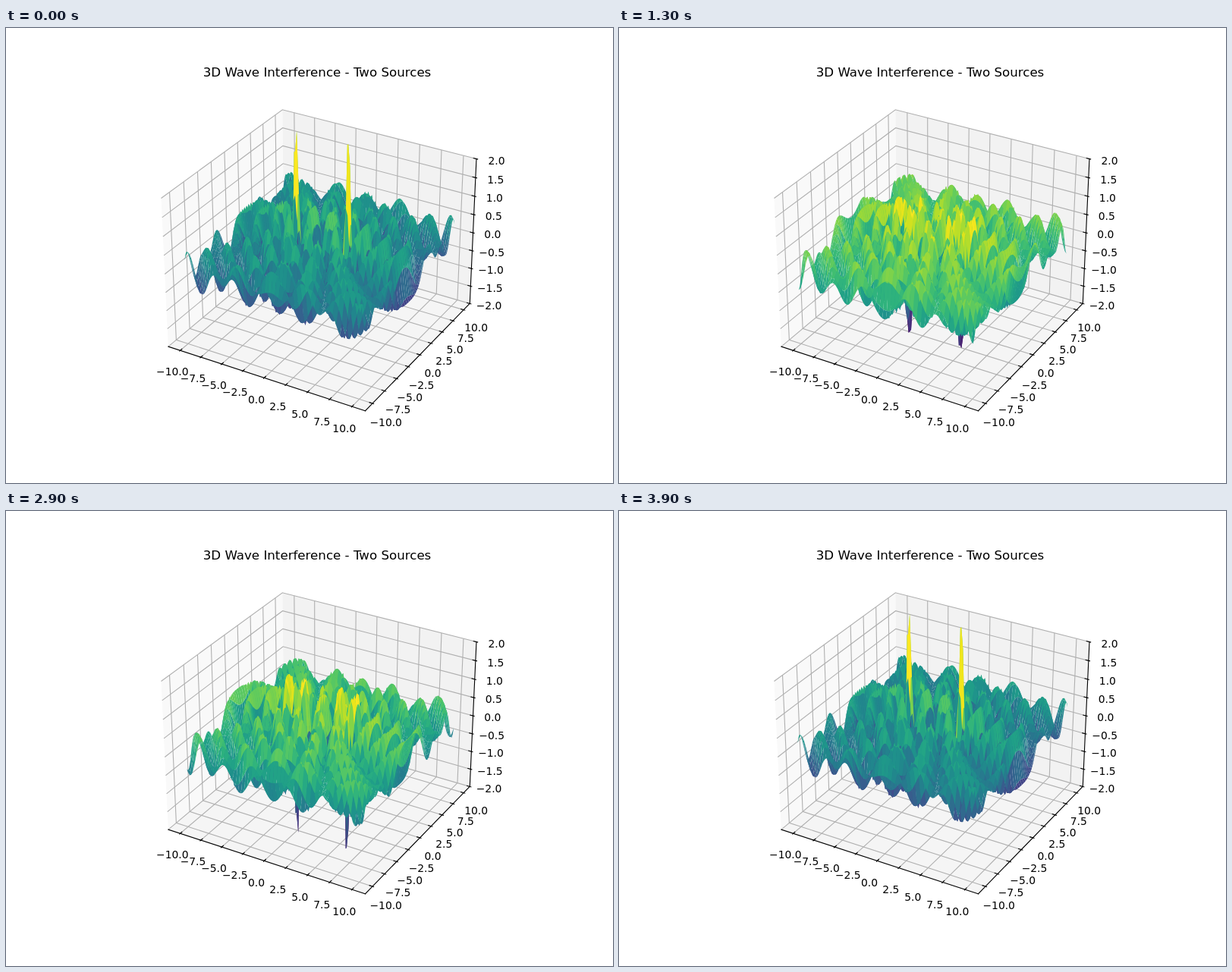
An HTML page with a canvas that plays this animation: 800x600 px, repeating every 4000 ms.

```html
<!DOCTYPE html>
<html lang="en">
<head>
<meta charset="utf-8">
<title>3D Wave Interference</title>
<style>
  html, body { margin: 0; width: 100%; height: 100%; overflow: hidden; background: #fff; }
  svg, canvas { position: absolute; left: 0; top: 0; }
  text { font: 13.89px "DejaVu Sans", sans-serif; text-anchor: middle; }
  .title { font-size: 16.67px; }
  .grid, .axis { fill: none; stroke: #b0b0b0; stroke-width: 1.11; }
  .axis { stroke: #000; stroke-linecap: square; }
  .tick { stroke-linecap: butt; }
</style>
</head>
<body>
<svg id="axes" width="800" height="600"><text class="title" x="410" y="64">3D Wave Interference - Two Sources</text></svg>
<canvas id="surface" width="800" height="600"></canvas>
<script>
// Box half sizes and data scales
const A = 0.59524, H = 0.44643;
const SX = A / (11 + 22 / 48), SZ = H / 2;

// Perspective camera: elevation 30, azimuth -60, distance 10
const EL = Math.PI / 6, AZ = -Math.PI / 3;
const ce = Math.cos(EL), se = Math.sin(EL), ca = Math.cos(AZ), sa = Math.sin(AZ);

function project(x, y, z) {
  const depth = 10 - (ce * ca * x + ce * sa * y + se * z);
  const f = 2497.3 / depth;
  return [
    416.24 + f * (-sa * x + ca * y),
    296.76 - f * (-se * ca * x - se * sa * y + ce * z),
    1 / depth
  ];
}

// Static axes
const svg = document.getElementById("axes");

function add(tag, attrs, text) {
  const el = document.createElementNS("http://www.w3.org/2000/svg", tag);
  for (const key in attrs) el.setAttribute(key, attrs[key]);
  if (text) el.textContent = text;
  svg.appendChild(el);
}

const coords = pts => pts.map(p => project(...p).slice(0, 2).map(v => v.toFixed(2)).join()).join(" ");
const line = (cls, ...pts) => add("polyline", { class: cls, points: coords(pts) });
const pane = (fill, ...pts) => add("polygon", { fill, points: coords(pts) });

function label(value, pos, drop) {
  const [x, y] = project(...pos);
  add("text", { x: x.toFixed(1), y: Math.round(y + drop) }, value.toFixed(1).replace("-", "\u2212"));
}

function drawAxes() {
  const pad = 0.079, out = 0.0095, inn = 0.019;
  const steps = [-4, -3, -2, -1, 0, 1, 2, 3, 4];

  pane("#f9f9f9", [-A, -A, -H], [-A, A, -H], [-A, A, H], [-A, -A, H]);
  pane("#f2f2f2", [-A, A, -H], [A, A, -H], [A, A, H], [-A, A, H]);
  pane("#f5f5f5", [-A, -A, -H], [A, -A, -H], [A, A, -H], [-A, A, -H]);

  for (const s of steps) {
    const p = s * 2.5 * SX, z = s * 0.5 * SZ;
    line("grid", [p, -A, -H], [p, A, -H], [p, A, H]);
    line("grid", [A, p, -H], [-A, p, -H], [-A, p, H]);
    line("grid", [A, A, z], [-A, A, z], [-A, -A, z]);
  }
  line("axis", [-A, -A, -H], [A, -A, -H]);
  line("axis", [A, -A, -H], [A, A, -H]);
  line("axis", [A, A, -H], [A, A, H]);

  for (const s of steps) {
    const p = s * 2.5 * SX, z = s * 0.5 * SZ;
    line("axis tick", [p, -A - out, -H], [p, -A + inn, -H]);
    line("axis tick", [A + out, p, -H], [A - inn, p, -H]);
    line("axis tick", [A + out, A, z], [A - inn, A, z]);
    label(s * 2.5, [p, -A - pad, -H - pad], 6.9);
    label(s * 2.5, [A + pad, p, -H - pad], 6.9);
    label(s * 0.5, [A + pad, A + pad, z], 10.8);
  }
}

// Viridis as a polynomial, one row per channel
const VIRIDIS = [
  [0.27773, 0.10509, -0.33086, -4.63423, 6.22827, 4.77638, -5.43546],
  [0.00541, 1.40461, 0.21485, -5.79910, 14.17993, -13.74515, 4.64585],
  [0.33410, 1.38459, 0.09510, -19.33244, 56.69055, -65.35303, 26.31244]
];
const palette = Array.from({ length: 256 }, (_, i) => {
  const rgb = VIRIDIS.map(c => Math.round(255 * c.reduceRight((sum, k) => sum * i / 255 + k, 0)));
  return `rgb(${rgb})`;
});

// Surface: 100 x 100 samples, drawn as patches two samples wide
const N = 100, K = Math.PI, SOURCE = 3;
const ctx = document.getElementById("surface").getContext("2d");
const at = i => -10 + 20 * i / (N - 1);

const patches = [];
for (let r = 0; r < N - 1; r += 2) {
  for (let c = 0; c < N - 1; c += 2) {
    const r2 = Math.min(r + 2, N - 1), c2 = Math.min(c + 2, N - 1);
    const ring = [];
    for (let j = c; j < c2; j++) ring.push(r * N + j);
    for (let i = r; i < r2; i++) ring.push(i * N + c2);
    for (let j = c2; j > c; j--) ring.push(r2 * N + j);
    for (let i = r2; i > r; i--) ring.push(i * N + c);
    patches.push({ ring });
  }
}

function wave(dx, y, phase) {
  const r = Math.hypot(dx, y);
  return Math.cos(K * r - phase) / Math.sqrt(r);
}

function drawSurface(phase) {
  const heights = [], points = [];
  for (let i = 0; i < N * N; i++) {
    const x = at(i % N), y = at(Math.floor(i / N));
    const z = wave(x + SOURCE, y, phase) + wave(x - SOURCE, y, phase);
    heights.push(z);
    points.push(project(x * SX, y * SX, z * SZ));
  }

  let low = Infinity, high = -Infinity;
  for (const p of patches) {
    let z = 0, near = 0;
    for (const i of p.ring) {
      z += heights[i];
      near += points[i][2];
    }
    p.z = z / p.ring.length;
    p.near = near / p.ring.length;
    low = Math.min(low, p.z);
    high = Math.max(high, p.z);
  }

  ctx.clearRect(0, 0, 800, 600);
  for (const p of [...patches].sort((a, b) => a.near - b.near)) {
    ctx.fillStyle = palette[Math.min(255, Math.floor(256 * (p.z - low) / (high - low)))];
    ctx.beginPath();
    for (const i of p.ring) ctx.lineTo(points[i][0], points[i][1]);
    ctx.closePath();
    ctx.fill();
  }
}

// 40 steps of 100 ms; the phase makes two turns from the first step to the last
let shown = -1;
function tick() {
  const step = Math.floor(performance.now() / 100 + 0.01) % 40;
  if (step !== shown) {
    shown = step;
    drawSurface(4 * Math.PI * step / 39);
  }
  requestAnimationFrame(tick);
}

drawAxes();
tick();
</script>
</body>
</html>
```
